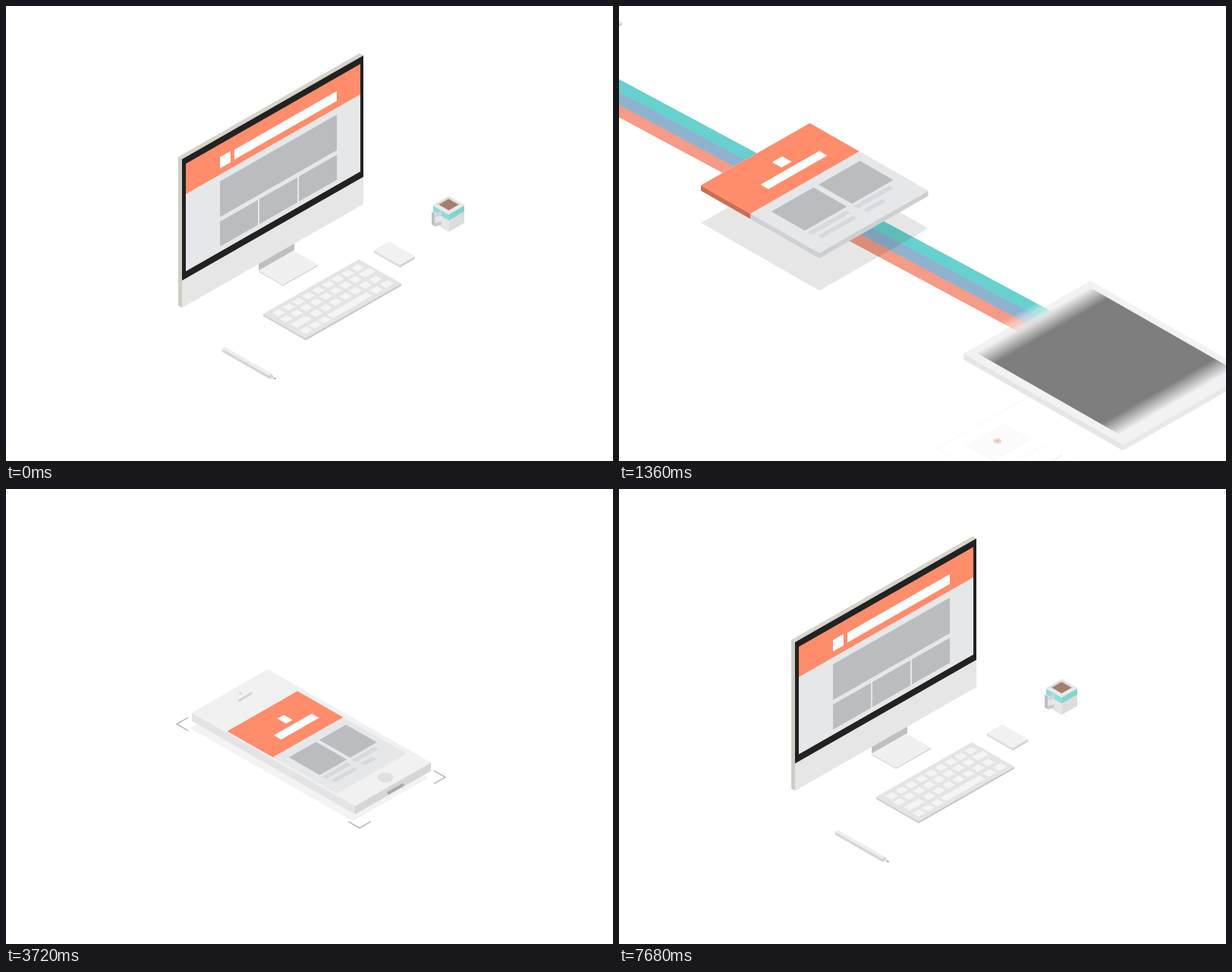
Recreate the animation shown at these times as an HTML page with a canvas. Size 800 by 600 pixels, loop 7.72 s.

```html
<!DOCTYPE html>
<html lang="en">
<head>
<meta charset="utf-8">
<title>Responsive page loop</title>
<style>
html, body { margin: 0; width: 100%; height: 100%; overflow: hidden; background: #fff; }
canvas { display: block; }
</style>
</head>
<body>
<canvas id="stage" width="800" height="600"></canvas>
<script>
const ctx = document.getElementById('stage').getContext('2d');
const LOOP = 7720, K = 0.572;
const CORAL = '#ff8c6b', LIGHT = '#e6e7e8', GREY = '#bbbcc0', DARK = '#222';
const RIBBONS = ['#f59b87', '#8fb2ce', '#66d1cf'];

// Easing and interpolation
const unit = (t, s, e) => Math.min(1, Math.max(0, (t - s) / (e - s)));
const cubic = u => u < .5 ? 4 * u ** 3 : 1 - 4 * (1 - u) ** 3;
const quad = u => u < .5 ? 2 * u * u : 1 - 2 * (1 - u) ** 2;
const expo = u => u >= 1 ? 1 : 1 - 2 ** (-10 * u);
const ease = (t, s, e) => cubic(unit(t, s, e));
const mix = (a, b, p) => a + (b - a) * p;
const mixAll = (a, b, p) => a.map((v, i) => mix(v, b[i], p));

// Isometric planes: floor, wall facing right, wall facing left
const FLOOR = [1, -K, 1, K], RIGHT = [1, -K, 0, 1], LEFT = [1, K, 0, 1];

function layer(draw, alpha = 1) {
  if (alpha <= 0) return;
  ctx.save();
  ctx.globalAlpha *= alpha;
  draw();
  ctx.restore();
}

function on(plane, x, y, draw) {
  layer(() => { ctx.transform(...plane, x, y); draw(); });
}

function rect(a, b, w, h, color) {
  ctx.fillStyle = color;
  ctx.fillRect(a, b, w, h);
}

function face(plane, x, y, w, h, color) {
  on(plane, x, y, () => rect(0, 0, w, h, color));
}

function box(x, y, a, b, h, top, left, right) {
  face(LEFT, x, y, b, h, left);
  face(RIGHT, x + b, y + K * b, a, h, right);
  face(FLOOR, x, y, a, b, top);
}

function poly(points, color) {
  ctx.beginPath();
  points.forEach(p => ctx.lineTo(...p));
  ctx.fillStyle = color;
  ctx.fill();
}

function line(points, color, width = 1, dash = []) {
  ctx.beginPath();
  points.forEach(p => ctx.lineTo(...p));
  ctx.strokeStyle = color;
  ctx.lineWidth = width;
  ctx.setLineDash(dash);
  ctx.stroke();
  ctx.setLineDash([]);
}

function oval(x, y, rx, ry, color) {
  ctx.beginPath();
  ctx.ellipse(x, y, rx, ry, 0, 0, 7);
  ctx.fillStyle = color;
  ctx.fill();
}

function ribbon(x, y, width, slope, i, tail, head, fade) {
  if (head <= tail) return;
  on([1, -K, 1, slope], x, y, () => {
    let fill = RIBBONS[i];
    if (fade) {
      fill = ctx.createLinearGradient(0, head - fade, 0, head);
      fill.addColorStop(0, RIBBONS[i]);
      fill.addColorStop(1, RIBBONS[i] + '00');
    }
    rect(i * width, tail, width + .4, head - tail, fill);
  });
}

// Fill along one axis with soft ends
function softScreen(a, b, w, h, soft, endSoft, color) {
  const g = ctx.createLinearGradient(0, b, 0, b + h);
  g.addColorStop(0, color + '00');
  g.addColorStop(Math.min(.49, soft / h), color);
  g.addColorStop(1 - Math.min(.49, endSoft / h), color);
  g.addColorStop(1, endSoft ? color + '00' : color);
  rect(a, b, w, h, g);
}

// Desk
function monitorPage(t) {
  const build = t > 5600;
  const slide = build ? 0 : 148 * ease(t, 360, 1000);
  const show = (s, e) => build ? ease(t, s, e) : 1;
  on(RIGHT, 237, 208, () => {
    ctx.beginPath();
    ctx.rect(0, 0, 230, 142);
    ctx.clip();
    ctx.translate(0, slide);
    rect(0, 0, 230, 142 * show(6800, 7100), LIGHT);
    rect(0, 0, 230, 40 * show(6700, 7000), CORAL);
    rect(45, 17, 14 * show(7000, 7200), 15, '#fff');
    rect(64, 18, 135 * show(7050, 7400), 13, '#fff');
    rect(45, 49, 154 * show(7150, 7500), 47, GREY);
    for (let i = 0; i < 3; i++)
      rect(45 + 52 * i, 102, 50, 33 * show(7250 + 80 * i, 7480 + 80 * i), GREY);
  });
}

function monitor(t) {
  const build = t > 5600;
  const grow = build ? expo(unit(t, 6245, 6745)) : 1;
  const len = build ? ease(t, 5680, 6150) : 1;
  if (!len) return;
  const h = 196 * grow, top = 398 - h, w = 239 * len;
  if (h > 1) {
    face(LEFT, 227, top - 3, 5, h, '#cdcdc5');
    face(RIGHT, 232, top, w, h, '#e6e6e6');
  }
  face(FLOOR, 227, top - 3, w, 5, '#d5d5cd');
  const black = build ? ease(t, 6480, 6800) : 1;
  if (black) face(RIGHT, 232, 202, 239, 160 * black, DARK);
  if (black === 1) monitorPage(t);
}

function stand(t) {
  const p = t > 5600 ? ease(t, 5850, 6150) : 1;
  if (!p) return;
  face(RIGHT, 333, 349 - 12 * p, 47, 12 * p, '#bfbfc0');
  box(333, 349, 46, 32 * p, 2, '#f0f0f0', '#dedede', '#d6d6d6');
}

function keyboard(t) {
  const build = t > 5600, p = build ? ease(t, 5640, 6000) : 1;
  if (!p) return;
  box(339, 406, 126 * p, 56, 3, '#e4e4e4', '#d2d2d2', '#cbcbcb');
  on(FLOOR, 339, 406, () => {
    const key = (a, b, w) => {
      const s = 5950 + (126 - a - w) * 4.5;
      const q = build ? ease(t, s, s + 90) : 1;
      if (q) layer(() => rect(a, b - 4 * (1 - q), w, 8, '#f4f4f4'), q);
    };
    for (let i = 0; i < 9; i++) {
      key(7 + 13 * i, 5, 9);
      if (i < 8) key(5 + 13 * i, 17, 9);
      if (i > 1) key(5 + 13 * i, 30, 9);
    }
    key(109, 17, 14);
    key(6, 30, 20);
    [5, 17, 29].forEach(a => key(a, 43, 9));
    key(41, 43, 52);
    key(97, 43, 10);
    key(111, 43, 10);
  });
}

function mug(t) {
  const build = t > 5600, p = build ? ease(t, 5640, 6080) : 1;
  if (!p) return;
  const y = 262 + 24 * (1 - p);
  box(563, y, 20.5, 20.5, 24 * p, '#e9e9e9', '#e6e6e8', '#dbdcde');
  face(LEFT, 563, y + 1.5, 20.5, 7.5 * p, '#90dcd6');
  face(RIGHT, 583.5, y + 13.2, 20.5, 7.5 * p, '#82d5cf');
  poly([[567, y], [583.5, y - 9.5], [583.5, y]], '#cfcfd2');
  poly([[583.5, y - 9.5], [600, y], [583.5, y]], '#dcdcdf');
  const c = build ? ease(t, 6000, 6500) : 1, r = mix(7, 13, c);
  layer(() => face(FLOOR, 583.5 - r, y + mix(4, 0, c), r, r, '#a47f6b'), build ? ease(t, 5900, 6150) : 1);
  const q = build ? ease(t, 6200, 6550) : 1, x = mix(571, 561, q);
  layer(() => {
    face(LEFT, x, mix(273, 271, q), 4, 17, '#bfc0c7');
    if (q > .2) {
      poly([[x + 4, 275], [574, 270], [574, 276], [x + 4, 279]], '#d3d4d9');
      poly([[x + 4, 286], [574, 284], [574, 288], [x + 4, 291]], '#cacbd0');
    }
  }, build ? ease(t, 6050, 6200) : 1);
}

function trackpad(t) {
  const p = t > 5600 ? ease(t, 5700, 6050) : 1;
  if (p) box(485, 322, 20, 34 * p, 3.5, '#f1f1f1', '#dedede', '#d2d2d2');
}

function pen(t) {
  const p = t > 5600 ? ease(t, 5850, 6330) : 1;
  if (!p) return;
  const n = 62 * p;
  box(285, 452, 4, n, 4, '#ededf0', '#d4d5da', '#c9cad0');
  const x = 285 + n, y = 452 + K * n;
  poly([[x, y + 4], [x + 4, y - 2], [x + 8.5, y + 4]], '#dedfe3');
  oval(x + 7.5, y + 3.8, 1, 1, '#888');
}

// Floor page; w and h are its lengths on the two floor axes
function page(x, y, w, h) {
  on(FLOOR, x, y, () => {
    ctx.scale(w / 150, h / 163);
    rect(0, 0, 150, 163, LIGHT);
    rect(0, 0, 150, 68, CORAL);
    rect(77, 21, 14, 13, '#fff');
    rect(42, 40, 81, 11, '#fff');
    rect(17, 80, 58, 46, GREY);
    rect(82, 80, 57, 46, GREY);
    [[17, 130, 53], [20, 141, 48], [80, 130, 49], [82, 141, 26]]
      .forEach(([a, b, n]) => rect(a, b, n, 6, '#d6d9de'));
  });
}

function flight(t) {
  const p = quad(unit(t, 554, 2078)), s = mix(.952, 1, p ** 4);
  const w = 150 * s, h = 163 * s;
  const x = mix(314, 1184, p) - h;
  const y = 352 + 507 * p + 6 * p ** 8 - K * h;
  return { p, x, y, w, h, thick: 7 * (1 - p ** 8) };
}

function flyingPage(f, t) {
  layer(() => {
    if (t < 1250) {
      const edge = x => 395 - K * (x - 232);
      ctx.beginPath();
      [[-300, edge(-300)], [900, edge(900)], [2500, 3000], [-300, 3000]].forEach(q => ctx.lineTo(...q));
      ctx.clip();
    }
    box(f.x, f.y, f.w, f.h, f.thick, LIGHT, '#cfd0d5', '#cecfd3');
    face(LEFT, f.x, f.y, f.h * 68 / 163, f.thick, '#cf6c52');
    page(f.x, f.y, f.w, f.h);
  });
}

// Tablet
function tablet(t) {
  const gone = ease(t, 2350, 2700);
  const [x, y, a, b] = mixAll([218, 327, 167, 210], [240, 331, 162, 184], gone);
  const soft = mix(25, 1, ease(t, 1300, 1800));
  box(x, y, a, b, 8 * (1 - gone), '#f2f2f2', '#e6e6e6', '#e9e9e9');
  layer(() => on(FLOOR, 247, 333, () =>
    softScreen(0, -soft / 2, 150, 164 + soft, soft, soft, '#222222')),
    mix(.56, 1, ease(t, 1340, 1800)) * (1 - gone));
}

function notes(t) {
  const dots = [2, 2];
  layer(() => {
    line([[264, 346], [254, 352], [306, 382], [276, 400]], '#dadada');
    line([[276, 400], [183, 452], [230, 479]], '#d5d5d5', 1, dots);
    box(222, 447, 49, 35, 2, '#f3f3f3', '#e6e6e6', '#e6e6e6');
    oval(262.5, 442.5, 5.5, 3.5, '#e58470');
    oval(262.5, 442.5, 2, 1.2, '#b9877d');
    line([[275, 476], [324, 449]], '#f1f1f1', 6, [4, 2]);
    line([[313, 482], [348, 461]], '#cfcfcf', 2, [5, 1]);
    line([[297, 481], [278, 490], [300, 500], [366, 464], [346, 453]], '#dcdcdc', 1, dots);
    oval(297.5, 494, 4, 4, CORAL);
  }, ease(t, 1100, 1700) * (1 - ease(t, 2900, 3300)));
}

// Brackets travel from tablet corners to phone corners
function brackets(t) {
  const p = ease(t, 2900, 3500), n = 15 * ease(t, 2440, 2720);
  const at = (from, to) => mixAll(from, to, p);
  const corner = ([x, y], s1, s2, v1, v2) =>
    line([[x + s1 * n, y + v1 * K * n], [x, y], [x + s2 * n, y + v2 * K * n]], '#b9b9b9', 1.6);
  if (n) layer(() => {
    corner(at([203, 322], [225, 310]), 1, 1, -1, 1);
    corner(at([605, 349], [579, 380]), -1, -1, -1, 1);
    corner(at([428, 449], [466, 447]), -1, 1, -1, -1);
  }, 1 - ease(t, 5150, 5500));
}

// Phone
function phonePage(t) {
  const p = ease(t, 4300, 4900), s = 1 - .9 * p;
  const w = 92 * s, h = mix(144, 30, p);
  const cx = mix(410, 385, p), cy = mix(335, 322, p);
  const x = cx - (w + h) / 2, y = cy - K * (h - w) / 2;
  layer(() => on(FLOOR, x, y, () => {
    ctx.scale(w / 92, h / 144);
    rect(0, 0, 92, 144, LIGHT);
    rect(0, 0, 92, 57, CORAL);
    const drift = 45 * p;
    rect(35 + drift, 16 - drift, 18, 14, '#fff');
    rect(17, 37 - drift * .6, 58, 9, '#fff');
    rect(8 + drift * .4, 72 + drift * .6, 62, 44, GREY);
    if (p < .4) rect(12, 124, 45, 6, '#d6d9de');
  }), ease(t, 3760, 3860) * (1 - ease(t, 4780, 4920)));
}

function phone(t) {
  const m = ease(t, 2950, 3600), up = ease(t, 3250, 3750);
  const [x, y, a, b] = mixAll([240, 331, 162, 184], [245, 306, 100, 215], m);
  layer(() => {
    if (up) layer(() => face(FLOOR, x - 3, y + 9, a, b, '#f3f3f3'), up);
    box(x, y - 11 * up, a, b, 11 * up, '#f1f1f1', '#e4e4e6', '#d6d6d8');
    layer(() => {
      line([[306, 280], [324, 269]], '#cfcfcf', 3);
      oval(309, 269.5, 1.8, 1.3, '#cfcfcf');
      layer(() => on(FLOOR, 245, 295, () => {
        const start = mix(45, 189, ease(t, 4350, 5150));
        const edge = mix(62, 80, unit(t, 4500, 4800));
        const b0 = t < 4640 ? mix(45, edge, ease(t, 4350, 4640)) : Math.max(edge, start);
        if (b0 < 188) softScreen(2, b0, 93, 189 - b0, 14, 0, '#66696c');
      }), ease(t, 4200, 4320));
      oval(500, 380.5, 10.5, 6.8, '#dfdfe0');
      line([[503, 401.5], [524, 389.5]], '#a5a5a8', 4);
    }, ease(t, 3500, 3800));
    phonePage(t);
  }, 1 - ease(t, 5200, 5560));
}

function guides(t) {
  layer(() => {
    line([[247, 324], [455, 438]], '#cacaca', 1, [2, 2]);
    line([[487, 433], [560, 391]], '#cacaca', 1, [2, 2]);
    line([[483, 303], [602, 369]], '#d2d2d2', 1, [2, 2]);
    [[483, 303], [602, 369]].forEach(([x, y]) => {
      oval(x, y, 4, 2.6, '#cacaca');
      oval(x, y, 2.6, 1.4, '#fff');
    });
    for (let i = 0; i < 8; i++)
      oval(299 + 6.3 * i, 366.5 + 3.55 * i, 2.6, 1.8, i === 7 ? CORAL : '#cdcdcd');
  }, ease(t, 3700, 4100) * (1 - ease(t, 5100, 5450)));
}

function hole(t) {
  const open = ease(t, 3720, 4000) * (1 - ease(t, 5280, 5580));
  if (!open) return;
  layer(() => {
    poly([[598, 492], [614, 483], [614, 501]], '#eeeeee');
    face(RIGHT, 614, 483, 47, 15 * open, '#f0f0f0');
    poly([[660, 455], [674, 462], [660, 470]], '#d0d0d2');
  }, open);
  for (let i = 0; i < 3; i++) {
    const head = 137 * ease(t, 4040 + 70 * i, 4420 + 70 * i);
    const tail = 137 * ease(t, 4860 + 70 * i, 5200 + 70 * i);
    ribbon(492, 412, 13, .585, i, Math.min(tail, 122), Math.min(head, 122));
    const drop = Math.max(0, head - 122), lost = Math.max(0, tail - 122);
    if (drop > lost) on(RIGHT, 614, 483, () => rect(13 * i, lost, 13.3, drop - lost, RIBBONS[i]));
  }
}

function desk(t) {
  stand(t);
  if (t < 2120) layer(() => {
    // The desk scene is cropped until the camera leaves it
    if (t < 820) {
      ctx.beginPath();
      ctx.rect(0, 0, 789, 900);
      ctx.clip();
    }
    [369, 176, 272].forEach((s, i) =>
      ribbon(366, 365, 15, .537, i, 697 * ease(t, 1250, 2030), 697 * ease(t, s, s + 900), 25));
  });
  keyboard(t);
  mug(t);
  trackpad(t);
  pen(t);
}

function draw(t) {
  ctx.setTransform(1, 0, 0, 1, 0, 0);
  ctx.globalAlpha = 1;
  rect(0, 0, 800, 600, '#fff');
  if (t < 2120) {
    const f = flight(t);
    layer(() => {
      ctx.translate(-771 * ease(t, 380, 2085), -440 * ease(t, 330, 2110));
      if (t > 780) layer(() => {
        ctx.translate(771, 440);
        tablet(t);
        notes(t);
      });
      desk(t);
      if (t > 560) layer(() => face(FLOOR, f.x, f.y + 50 * (1 - f.p ** 8), f.w, f.h, '#000'),
        .1 * ease(t, 560, 680) * (1 - f.p ** 8));
      monitor(t);
      if (t > 600) flyingPage(f, t);
    });
  } else if (t < 5600) {
    if (t < 2950) tablet(t);
    notes(t);
    brackets(t);
    if (t >= 2950) {
      guides(t);
      hole(t);
      phone(t);
    }
    if (t < 3860) {
      const up = ease(t, 2400, 2760), m = ease(t, 3180, 3800);
      const [x, y, w, h] = mixAll([247, 333 - 87 * up, 150, 163], [292, 320, 92, 144], m);
      layer(() => page(x, y, w, h), 1 - ease(t, 3780, 3860));
    }
  } else {
    desk(t);
    monitor(t);
  }
}

const begin = performance.now();
function tick() {
  draw((performance.now() - begin) % LOOP);
  requestAnimationFrame(tick);
}
tick();
</script>
</body>
</html>
```
